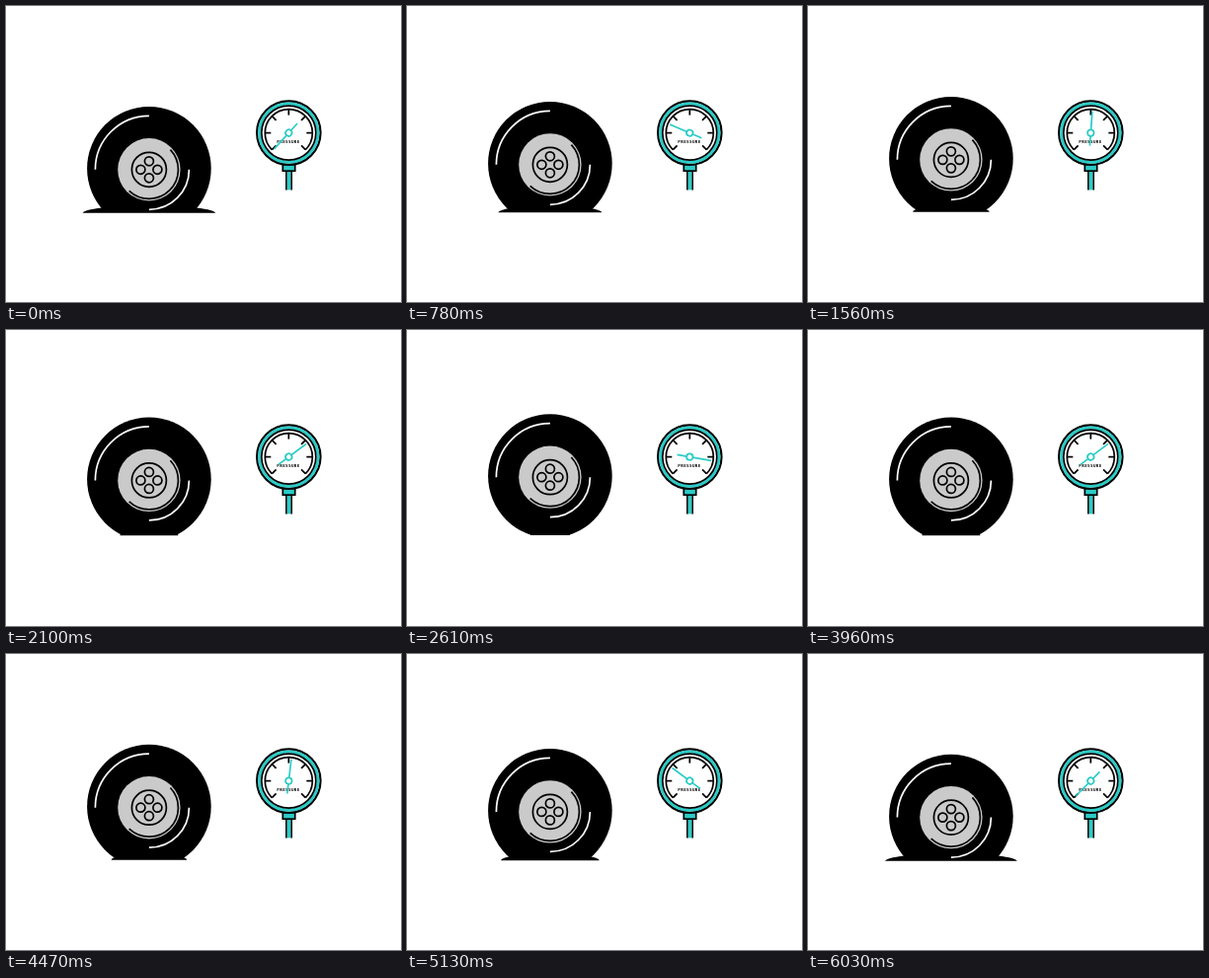
Write an HTML page that moves like this. It is 400x300 px and loops after 6.06 s.

```html
<!DOCTYPE html>
<html lang="en">
<head>
<meta charset="utf-8">
<title>Tyre pressure</title>
<style>
  html, body { margin: 0; width: 100%; height: 100%; overflow: hidden; background: #fff; }
  svg { display: block; width: 100vw; height: 100vh; }
  .line { fill: none; stroke: #000; stroke-width: 1.7; }
  .shine { fill: none; stroke: #fff; stroke-width: 1.7; }
  .teal { stroke: #2bcbc6; fill: none; }
  text { font: bold 4.2px "Noto Sans Mono", "DejaVu Sans Mono", monospace; letter-spacing: .4px; text-anchor: middle; }
</style>
</head>
<body>
<svg viewBox="0 0 400 300">
  <clipPath id="ground"><rect width="400" height="207.7"/></clipPath>

  <path id="base"/>
  <g clip-path="url(#ground)">
    <g id="tyre">
      <circle r="62.8"/>
      <g transform="translate(0 1.1)">
        <path class="shine" d="M-54.5 0A54.5 54.5 0 0 1 0-54.5M40.5 0A40.5 40.5 0 0 1 0 40.5"/>
        <circle r="31.7" fill="#cacaca"/>
        <path class="line" d="M21.5-20.2A29.5 29.5 0 0 1-20.2 21.5"/>
        <circle class="line" r="17.5"/>
        <g class="line">
          <circle cx="-8.5" r="4.5"/><circle cx="8.5" r="4.5"/>
          <circle cy="-8.5" r="4.5"/><circle cy="8.5" r="4.5"/>
        </g>
      </g>
    </g>
  </g>

  <g transform="translate(286.3 128.6)">
    <path class="line" d="M-2.4 38V57.8M2.8 38V57.8"/>
    <path class="teal" d="M.2 38V57.8" stroke-width="3.5"/>
    <rect x="-6" y="32" width="12.4" height="6.6" fill="#2bcbc6" stroke="#000" stroke-width="1.7"/>
    <circle r="32.2" fill="#fff" stroke="#000" stroke-width="2.2"/>
    <circle class="teal" r="29.7" stroke-width="3"/>
    <circle class="line" r="27.5"/>
    <path class="line" d="M-17 17A24 24 0 1 1 17 17"/>
    <g id="ticks" class="line"></g>
    <text x="-.3" y="10.1">PRESSURE</text>
    <g id="needle" class="teal" stroke-width="1.7">
      <path d="M0 13V-22"/>
      <circle r="3.2" style="fill:#fff"/>
    </g>
  </g>
</svg>
<script>
  const LOOP = 6060, RADIUS = 62.8, GROUND = 207.7;
  const get = id => document.getElementById(id);
  const mix = (a, b, k) => a + (b - a) * k;

  for (let a = -135; a <= 135; a += 45)
    get('ticks').innerHTML += `<path d="M0-24V-18" transform="rotate(${a})"/>`;

  function draw(now) {
    // pressure rises to full at half the loop, then falls back
    const k = 1 - Math.abs(1 - 2 * (now % LOOP) / LOOP);
    const y = mix(164.7, 145.4, k), bottom = mix(209.8, GROUND, k);
    // the squashed base flares out beyond the tyre's contact line
    const contact = Math.sqrt(Math.max(0, RADIUS ** 2 - (GROUND - y) ** 2));
    const half = contact + 21.5 * (1 - k) ** 2;
    get('tyre').setAttribute('transform', `translate(144.9 ${y})`);
    get('base').setAttribute('d',
      `M${144.9 - half} ${bottom}a${half} ${mix(7.5, 5, k)} 0 0 1 ${2 * half} 0z`);
    get('needle').setAttribute('transform', `rotate(${mix(-138, 138, k)})`);
    requestAnimationFrame(draw);
  }
  draw(performance.now());
</script>
</body>
</html>
```
